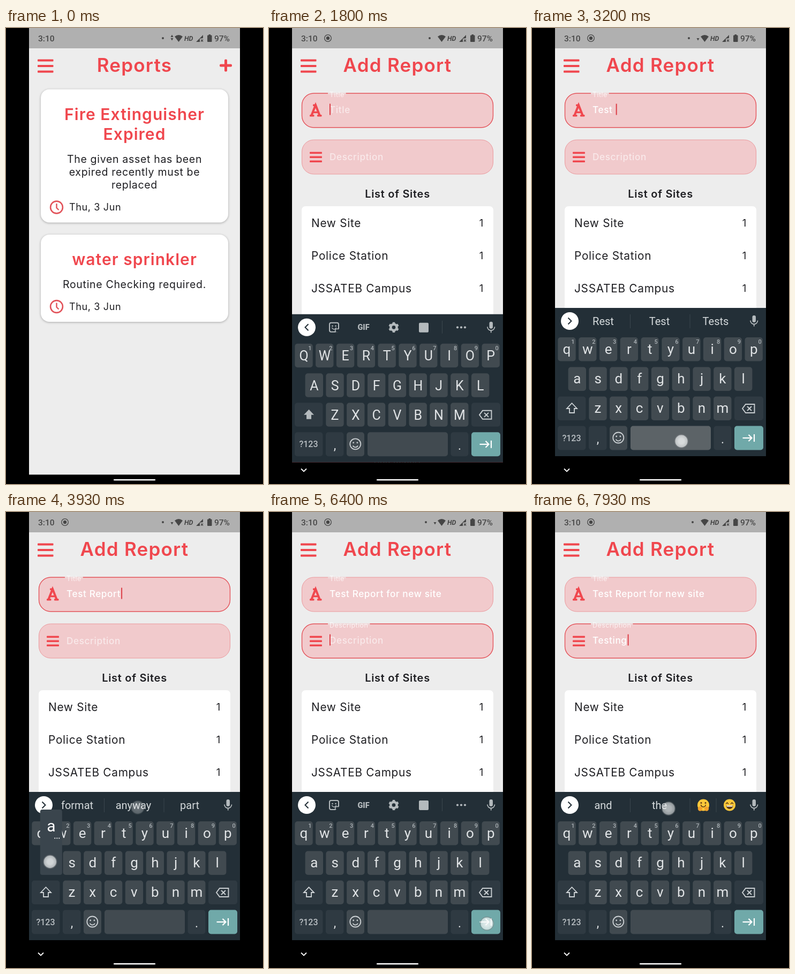
Animation, 480 px wide and 852 px high, one loop 8 s. Source, as an HTML page with a canvas:

```html
<!DOCTYPE html>
<html lang="en">
<head>
<meta charset="utf-8">
<title>Add Report</title>
<style>
  html, body { margin: 0; width: 100%; height: 100%; overflow: hidden; background: #000; }
  canvas { display: block; }
</style>
</head>
<body>
<canvas id="stage" width="480" height="852"></canvas>
<script>
const ctx = document.getElementById('stage').getContext('2d');
const LOOP = 8000;
const RED = '#f0474e', INK = '#1e1e22', PAGE = '#ededed', PINK = '#f1cacc';
const PANEL = '#232f37', KEY = '#414a50', DIM_KEY = '#2f3a42', ICON = '#b4babd', LETTER = '#e1e4e6';
const UI = 'Inter, "Open Sans", sans-serif', SYS = 'Roboto, sans-serif';

// Moments
const PAGE_AT = 1130, FOCUS_AT = 1560, NEXT_AT = 6330, DESC_AT = 6400;

// [time, key, suggestions afterwards, touch dx, touch dy]
// '^' shift, '<' backspace, '>' next, '*word' picks the middle suggestion
const steps = [
  [2465, 'T', ['The', 'This', 'To'], -5, 4],
  [2650, 'e', ['Te', 'Tell', 'Test'], 2, 3],
  [2830, 's', ['Tes', 'Test', 'Yes'], 4, 2],
  [3000, 't', ['Rest', 'Test', 'Tests'], 3, 2],
  [3150, ' ', ['the', 'is', 'for'], 20, 6],
  [3330, '^', ['the', 'is', 'for'], -2, -4],
  [3460, 'R', ['Re', 'Result', 'Run'], 2, 2],
  [3570, 'e', ['Red', 'Results', 'Re'], 3, 2],
  [3660, 'p', ['Rep', 'Report', 'Reply'], -3, 2],
  [3790, '*Report', ['format', 'anyway', 'part'], 8, 4],
  [3900, 'a', ['a', 'and', 'as'], -2, -2],
  [4270, '<', ['for', 'is', 'and'], 0, 2],
  [4420, 'f', ['for', 'from', 'f'], 2, 0],
  [4560, 'o', ['fo', 'for', 'do'], -3, 2],
  [4700, 'r', ['or', 'for', 'form'], 3, 2],
  [4830, ' ', ['the', 'a', 'this'], 40, 8],
  [4930, 'n', ['no', 'new', 'not'], 3, 1],
  [5020, 'e', ['ne', 'me', 'next'], 3, 1],
  [5335, 'w', ['new', 'news', 'newly'], 17, 0],
  [5392, ' ', ['one', 'the', 'year'], 55, 10],
  [5540, 's', ['so', 'see', 'some'], 4, 1],
  [5680, 'i', ['since', 'six', 'si'], 2, 2],
  [5810, 't', ['sit', 'site', 'sir'], 3, 2],
  [5950, 'e', ['sites', 'site', 'suite'], 4, 1],
  [NEXT_AT, '>', null, 2, 3],
  [7130, 'T', ['The', 'This', 'To'], 2, 3],
  [7300, 'e', ['Te', 'Tell', 'Test'], 4, 2],
  [7440, 's', ['Tes', 'Test', 'Yes'], 3, 2],
  [7570, 't', ['Rest', 'Test', 'Testing'], 3, 2],
  [7700, 'i', ['Testo', 'Testing', 'Tests'], 2, 2],
  [7840, '*Testing', ['and', 'the', 'hug', 'grin'], 17, 6],
].map(([t, key, words, dx, dy]) => ({ t, key, words, dx, dy }));

const between = (t, a, b) => t >= a && t < b;

// Drawing helpers
function rect(x, y, w, h, fill, r = 0) {
  ctx.fillStyle = fill;
  ctx.beginPath();
  ctx.roundRect(x, y, w, h, r);
  ctx.fill();
}

function text(str, x, y, size, color, { weight = 400, align = 'left', font = UI, style = '' } = {}) {
  ctx.font = `${style} ${weight} ${size}px ${font}`;
  ctx.letterSpacing = font === UI ? `${size * 0.035}px` : '0px';
  ctx.textAlign = align;
  ctx.fillStyle = color;
  ctx.fillText(str, x, y);
  return ctx.measureText(str).width;
}

function line(points, color, width, close = false) {
  ctx.beginPath();
  points.forEach(([x, y]) => ctx.lineTo(x, y));
  if (close) ctx.closePath();
  ctx.strokeStyle = color;
  ctx.lineWidth = width;
  ctx.stroke();
}

function poly(points, fill) {
  ctx.beginPath();
  points.forEach(([x, y]) => ctx.lineTo(x, y));
  ctx.fillStyle = fill;
  ctx.fill();
}

function disc(x, y, r, fill) {
  ctx.beginPath();
  ctx.arc(x, y, r, 0, Math.PI * 2);
  ctx.fillStyle = fill;
  ctx.fill();
}

function arc(x, y, r, color, width, from = 0, to = Math.PI * 2) {
  ctx.beginPath();
  ctx.arc(x, y, r, from, to);
  ctx.strokeStyle = color;
  ctx.lineWidth = width;
  ctx.stroke();
}

function bars(x, y, w, gap, h) {
  for (let i = 0; i < 3; i++) rect(x, y + i * gap, w, h, RED, 1);
}

// Status bar
function statusBar(t) {
  const c = '#464646', opt = { weight: 500, font: SYS };
  rect(43, 0, 394, 38, '#b0b0b0');
  text('3:10', 60, 25, 15.5, c, opt);
  if (t >= 270) {
    arc(110, 19, 6.3, c, 1.3);
    disc(110, 19, 3.2, c);
  }
  const both = t < 330;
  const down = both || between(t, 2200, 4500) || between(t, 5900, 7500);
  disc(down ? 293 : 300, 19, 2, c);
  if (both) poly([[307.5, 17], [310, 12.5], [312.5, 17]], c);
  if (down) poly([[307.5, 19], [312.5, 19], [310, 23.5]], c);
  ctx.beginPath();
  ctx.moveTo(322.5, 26);
  ctx.lineTo(315, 16);
  ctx.quadraticCurveTo(322.5, 10, 330, 16);
  ctx.fill();
  text('HD', 333, 24, 12.5, c, { weight: 700, font: SYS, style: 'italic' });
  poly([[355, 26], [368, 13], [368, 19], [362, 20], [362, 26]], c);
  line([[364, 21.5], [368, 25.5]], c, 1.3);
  line([[368, 21.5], [364, 25.5]], c, 1.3);
  rect(376, 13.5, 8.5, 12.5, c, 1);
  rect(378.5, 12, 3.5, 2, c);
  text('97%', 389, 25, 15.5, c, opt);
}

// Reports page
function card(y, h, title, body, dateY) {
  ctx.save();
  ctx.shadowColor = 'rgba(0,0,0,.3)';
  ctx.shadowBlur = 4;
  ctx.shadowOffsetY = 1;
  rect(65, y, 350, h, '#fff', 16);
  ctx.restore();
  title.forEach(([s, by]) => text(s, 240, by, 30, RED, { weight: 600, align: 'center' }));
  body.forEach(([s, by]) => text(s, 240, by, 19.5, INK, { align: 'center' }));
  arc(94.5, dateY, 11.4, '#e2545b', 2.6);
  line([[94.5, dateY - 7], [94.5, dateY + 1], [98.5, dateY + 5]], '#e2545b', 2.4);
  text('Thu, 3 Jun', 118, dateY + 6, 18, INK);
}

function reports() {
  text('Reports', 240, 82, 35, RED, { weight: 600, align: 'center' });
  rect(399, 67.5, 23, 5, RED, 2);
  rect(408, 58.5, 5, 23, RED, 2);
  card(114.5, 249, [['Fire Extinguisher', 172], ['Expired', 209]],
    [['The given asset has been', 252], ['expired recently must be', 276], ['replaced', 300]], 335);
  card(386, 163, [['water sprinkler', 443]], [['Routine Checking required.', 486]], 520.5);
}

// Text typed into a field by steps inside [from, to)
function typed(t, from, to) {
  let str = '', composing = false, picked = false, last = -1e4;
  for (const s of steps) {
    if (!between(s.t, from, to) || s.t + 50 > t) continue;
    last = s.t + 50;
    if (s.key === '<') {
      str = str.slice(0, -1);
      composing = false;
    } else if (s.key[0] === '*') {
      str = str.replace(/\S*$/, s.key.slice(1));
      composing = false;
      picked = true;
    } else if (/[a-z ]/i.test(s.key)) {
      if (picked && s.key !== ' ') str += ' ';
      str += s.key;
      composing = s.key !== ' ';
      picked = false;
    }
  }
  return { str, composing, last };
}

function field(y, label, entry, focused, focusAt, t) {
  rect(61.5, y, 357, 64, PINK, 22);
  ctx.strokeStyle = focused ? '#e4545b' : '#eb989c';
  ctx.lineWidth = focused ? 1.4 : 1;
  ctx.stroke();
  const lifted = focused || entry.str;
  const by = y + (lifted ? 36.5 : 37.5);
  if (lifted) {
    ctx.font = `12.5px ${UI}`;
    ctx.letterSpacing = '0.44px';
    rect(110, y - 1, ctx.measureText(label).width + 6, 3.5, '#f0d6d7');
    text(label, 113, y + 6.5, 12.5, 'rgba(255,255,255,.75)');
  }
  const opt = { weight: 500 };
  const w = text(entry.str || label, 113, by, 17.2, entry.str ? '#fff' : 'rgba(255,255,255,.58)', opt);
  if (!focused) return;
  if (entry.composing) {
    const start = ctx.measureText(entry.str.replace(/\S+$/, '')).width;
    rect(113 + start, by + 2.5, w - start, 1.2, '#fff');
  }
  const since = t - Math.max(focusAt, entry.last);
  if (since % 1000 < 500) rect(113 + (entry.str ? w + 1 : 0), by - 17, 2, 21, '#dc3f48');
}

function addReport(t) {
  text('Add Report', 240, 82, 35, RED, { weight: 600, align: 'center' });
  const inDesc = t >= DESC_AT;
  field(122, 'Title', typed(t, 0, NEXT_AT), t >= FOCUS_AT && !inDesc, FOCUS_AT, t);
  field(209, 'Description', typed(t, NEXT_AT, LOOP), inDesc, DESC_AT, t);
  line([[79.5, 163], [87, 144], [94.5, 163]], RED, 4);
  line([[82, 157.5], [92, 157.5]], RED, 3.4);
  rect(76, 162, 8.5, 3.5, RED, 1);
  rect(90, 162, 8.5, 3.5, RED, 1);
  rect(82, 142.5, 7, 3.5, RED, 1);
  bars(76, 231.5, 23, 8, 3.4);
  text('List of Sites', 240, 317, 20, INK, { weight: 600, align: 'center' });
  rect(61, 333, 358, 272, '#fff', 7);
  ['New Site', 'Police Station', 'JSSATEB Campus', 'Hospital'].forEach((s, i) => {
    text(s, 79, 372 + i * 61.1, 20.8, INK);
    text('1', 401, 371 + i * 61.1, 18.5, INK, { align: 'right' });
  });
  rect(43, 781, 394, 53.5, '#f2464b', 4);
  text('Add Report', 240, 814, 15.6, '#fff', { align: 'center' });
}

// Keyboard
const ROWS = [['qwertyuiop', 65, 600], ['asdfghjkl', 84.3, 655.5], ['zxcvbnm', 123, 710.5]];
const PITCH = 38.8;

function spot(key) {
  if (key === ' ') return [259, 766];
  if (key === '^') return [74, 710];
  if (key === '<') return [404, 710];
  if (key === '>') return [405, 766];
  if (key[0] === '*') return [238, 548];
  const [chars, x, y] = ROWS.find(r => r[0].includes(key.toLowerCase()));
  return [x + chars.indexOf(key.toLowerCase()) * PITCH, y];
}

const capsOn = t => t < 2515 || between(t, 3390, 3510) || between(t, 6990, 7180);

// Panel offset from its resting place
function slide(t) {
  const out = p => (1 - Math.min(p, 1)) ** 3;
  if (t < 1600) return 1;
  if (t < DESC_AT) return out((t - 1600) / 300);
  if (t < 6650) return Math.min((t - DESC_AT) / 180, 1) ** 2;
  return out((t - 6650) / 330);
}

function smile(x, y, r, color, width) {
  arc(x, y, r, color, width);
  disc(x - r * .36, y - r * .25, r * .14, color);
  disc(x + r * .36, y - r * .25, r * .14, color);
  arc(x, y + r * .08, r * .52, color, width, .15 * Math.PI, .85 * Math.PI);
}

function toolbar() {
  ctx.beginPath();
  ctx.roundRect(113, 539, 17, 17, 3);
  ctx.strokeStyle = ICON;
  ctx.lineWidth = 2;
  ctx.stroke();
  poly([[124, 557], [131, 557], [131, 550]], PANEL);
  line([[123.5, 556], [124, 551], [130, 550]], ICON, 1.6);
  disc(118.5, 545, 1.3, ICON);
  disc(124.5, 545, 1.3, ICON);
  arc(121.5, 547, 4, ICON, 1.5, .2, Math.PI - .2);
  text('GIF', 176.5, 552.5, 14.5, ICON, { weight: 900, align: 'center', font: SYS });
  arc(233, 547.5, 5.6, ICON, 4.5);
  for (let i = 0; i < 6; i++) {
    const a = i * Math.PI / 3 + Math.PI / 6, c = Math.cos(a), s = Math.sin(a);
    line([[233 + c * 6, 547.5 + s * 6], [233 + c * 9.6, 547.5 + s * 9.6]], ICON, 4.6);
  }
  rect(280, 539, 18, 18, ICON, 2);
  rect(323, 535, 1, 24, '#3b464d');
  [352, 359, 366].forEach(x => disc(x, 547.5, 2.1, ICON));
}

function emoji(kind, x, y) {
  disc(x, y, 11, '#fcc93a');
  const brown = '#5c3a16';
  if (kind === 'grin') {
    line([[x - 7, y - 2], [x - 4.5, y - 4.5], [x - 2, y - 2]], brown, 1.5);
    line([[x + 2, y - 2], [x + 4.5, y - 4.5], [x + 7, y - 2]], brown, 1.5);
    ctx.beginPath();
    ctx.arc(x, y + 1, 6.5, 0, Math.PI);
    ctx.fillStyle = brown;
    ctx.fill();
    rect(x - 5.5, y + 1, 11, 2, '#fff');
  } else {
    disc(x - 4, y - 4, 1.5, brown);
    disc(x + 4, y - 4, 1.5, brown);
    arc(x, y - 1, 4.5, brown, 1.5, .1, Math.PI - .1);
    disc(x - 6, y + 7, 4.2, '#f3a32c');
    disc(x + 6, y + 7, 4.2, '#f3a32c');
  }
}

function strip(words) {
  disc(70.5, 547.5, 16.5, '#fff');
  const d = words ? 3 : -3;
  line([[70.5 - d, 541.5], [70.5 + d, 547.5], [70.5 - d, 553.5]], PANEL, 2);
  rect(411.5, 537, 6.5, 13, ICON, 3.2);
  arc(414.7, 546.5, 6.8, ICON, 1.7, 0, Math.PI);
  line([[414.7, 553], [414.7, 557.5]], ICON, 1.8);
  if (!words) return toolbar();
  const opt = { align: 'center', font: SYS };
  const faces = words.length === 4;
  words.forEach((w, i) => {
    if (faces && i > 1) emoji(w, 320 + (i - 2) * 49, 547.5);
    else text(w, 133 + i * 105, 554.5, 20, '#d5dadc', opt);
  });
  [183, 294.5].concat(faces ? 343.5 : []).forEach(x => rect(x, 535, 1, 26, '#3b464d'));
}

function keys(t) {
  const caps = capsOn(t);
  const opt = { align: 'center', font: SYS };
  ROWS.forEach(([chars, x0, y], row) => [...chars].forEach((ch, i) => {
    const x = x0 + i * PITCH;
    rect(x - 16.7, y - 22, 33.4, 44.5, KEY, 5);
    text(caps ? ch.toUpperCase() : ch, x, y + (caps ? 9.5 : 8.5), caps ? 25 : 26, LETTER, opt);
    if (row === 0) text(String((i + 1) % 10), x + 11.5, y - 10, 11, '#aab1b5', { ...opt, weight: 500 });
  }));
  rect(48, 688.5, 52.5, 44.5, DIM_KEY, 5);
  rect(378, 688.5, 54, 44.5, DIM_KEY, 5);
  const arrow = [[74.5, 701], [84, 711], [79, 711], [79, 719], [70, 719], [70, 711], [65, 711]];
  if (caps) poly(arrow, ICON);
  else line(arrow, '#d0d5d8', 1.8, true);
  line([[393, 711], [399, 703], [415.5, 703], [415.5, 719], [399, 719]], '#c9ced1', 1.9, true);
  line([[402, 707], [410, 715]], '#c9ced1', 1.9);
  line([[410, 707], [402, 715]], '#c9ced1', 1.9);

  const held = steps.some(s => s.key === ' ' && between(t, s.t, s.t + 80));
  rect(48, 743.5, 52.5, 45, DIM_KEY, 5);
  rect(106, 743.5, 33.5, 45, DIM_KEY, 5);
  rect(145, 743.5, 33, 45, KEY, 5);
  rect(184, 743.5, 150, 45, held ? '#5c6367' : KEY, 5);
  rect(339.5, 743.5, 33, 45, DIM_KEY, 5);
  rect(378, 743.5, 54, 45, '#70a9a9', 5);
  text('?123', 74, 771.5, 16, '#b9bfc3', { ...opt, weight: 500 });
  text(',', 123, 776, 23, LETTER, opt);
  text('.', 356, 776, 23, LETTER, opt);
  smile(161.3, 765.5, 10, '#ccd1d4', 1.8);
  line([[393.5, 766], [410, 766]], '#fff', 2.2);
  line([[404.5, 760], [410.5, 766], [404.5, 772]], '#fff', 2.2);
  line([[415, 759], [415, 773]], '#fff', 2.2);
}

function popup(key) {
  const [x, y] = spot(key);
  rect(x - 20.5, y - 99.5, 41, 122, '#3a454d', 4);
  text(key, x, y - (key < 'a' ? 58 : 59), 30, '#fff', { align: 'center', font: SYS });
  for (let i = 0; i < 3; i++) disc(x + 7 + i * 4, y - 46, 1.1, '#fff');
}

function keyboard(t) {
  const off = slide(t);
  if (off >= 1) return;
  const dy = off * 329;
  ctx.save();
  ctx.beginPath();
  ctx.rect(43, 0, 394, 852);
  ctx.clip();
  ctx.translate(0, dy);
  rect(43, 523, 394, 277, PANEL);
  rect(43, 800, 394, 52, '#000');
  const done = steps.filter(s => s.t + 70 <= t);
  strip(done.length ? done[done.length - 1].words : null);
  keys(t);
  const pressed = steps.find(s => /[a-z]/i.test(s.key[0]) && between(t, s.t, s.t + 60));
  if (pressed) popup(pressed.key);
  ctx.restore();
  line([[60, 823.5], [65, 828.5], [70, 823.5]], '#fff', 1.8);
}

// Touch marks
const taps = [{ t: 1090, x: 414, y: 65 }, { t: 1480, x: 236, y: 156 }].concat(steps.map(s => {
  const [x, y] = spot(s.key);
  return { t: s.t, x: x + s.dx, y: y + s.dy };
}));

function touches(t) {
  for (const tap of taps) {
    const age = t - tap.t;
    if (age < 0 || age > 190) continue;
    ctx.globalAlpha = Math.min(1, (190 - age) / 120);
    const g = ctx.createRadialGradient(tap.x, tap.y, 5, tap.x, tap.y, 12);
    g.addColorStop(0, 'rgba(246,248,248,.8)');
    g.addColorStop(1, 'rgba(246,248,248,.62)');
    disc(tap.x, tap.y, 11.8, g);
    arc(tap.x, tap.y, 12.4, 'rgba(125,130,133,.5)', 1.6);
  }
  ctx.globalAlpha = 1;
}

function draw(t) {
  ctx.lineJoin = 'miter';
  rect(0, 0, 480, 852, '#000');
  rect(43, 38, 394, 796.5, PAGE);
  statusBar(t);
  bars(59, 58.5, 29.5, 10.5, 4);
  if (t < PAGE_AT) reports();
  else addReport(t);
  keyboard(t);
  rect(201, 843, 78, 2.6, '#fff', 1.3);
  touches(t);
}

function tick() {
  draw(performance.now() % LOOP);
  requestAnimationFrame(tick);
}
tick();
</script>
</body>
</html>
```
